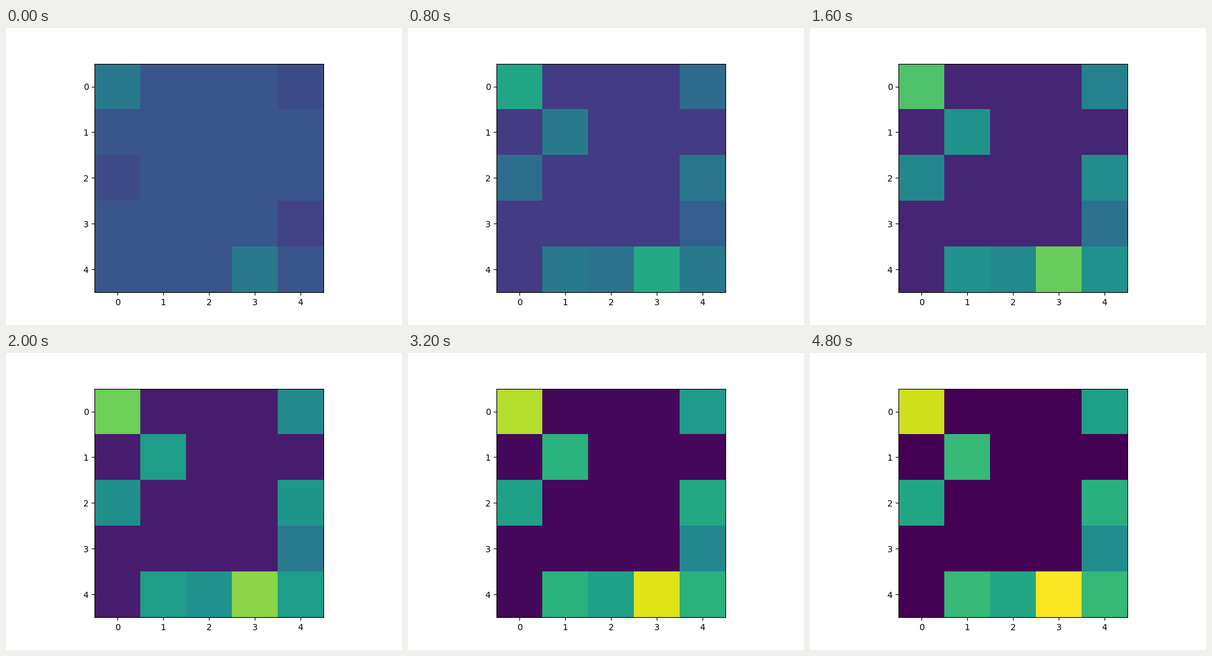
Recreate the animation shown at these times as a matplotlib script. Size 640 by 480 pixels, loop 6 s.

```python
import numpy as np
import matplotlib.pyplot as plt
from matplotlib.animation import FuncAnimation

STEP_MS = 200
STEPS = 30
SIZE = 5
START = 67

# Steps at which the grid updates; it rests longer as it settles.
UPDATES = [*range(5), *range(6, 13), 14, 16, 19, 24]

# Colour levels (0-255) at the start and once settled.
first = np.full((SIZE, SIZE), START)
first[[0, 4], [0, 3]] = 103
first[[0, 2], [4, 0]] = 59
first[3, 4] = 50

last = np.zeros((SIZE, SIZE))
last[[1, 4, 4], [1, 1, 4]] = 171
last[[2, 4], [0, 2]] = 153
last[0, 0], last[4, 3] = 237, 254
last[0, 4], last[2, 4], last[3, 4] = 145, 161, 125


def grid(step):
    """Ease every cell from its first level to its last."""
    shown = max(s for s in UPDATES if s <= step)
    left = (1 - shown / UPDATES[-1]) ** 2.35
    return np.rint(last + (first - last) * left)


fig, ax = plt.subplots(figsize=(6.4, 4.8), dpi=100)
image = ax.imshow(grid(0), cmap="viridis", vmin=0, vmax=255)


def update(step):
    image.set_data(grid(step))
    return [image]


anim = FuncAnimation(fig, update, frames=STEPS, interval=STEP_MS, repeat=True,
                     repeat_delay=0)
plt.show()
```
